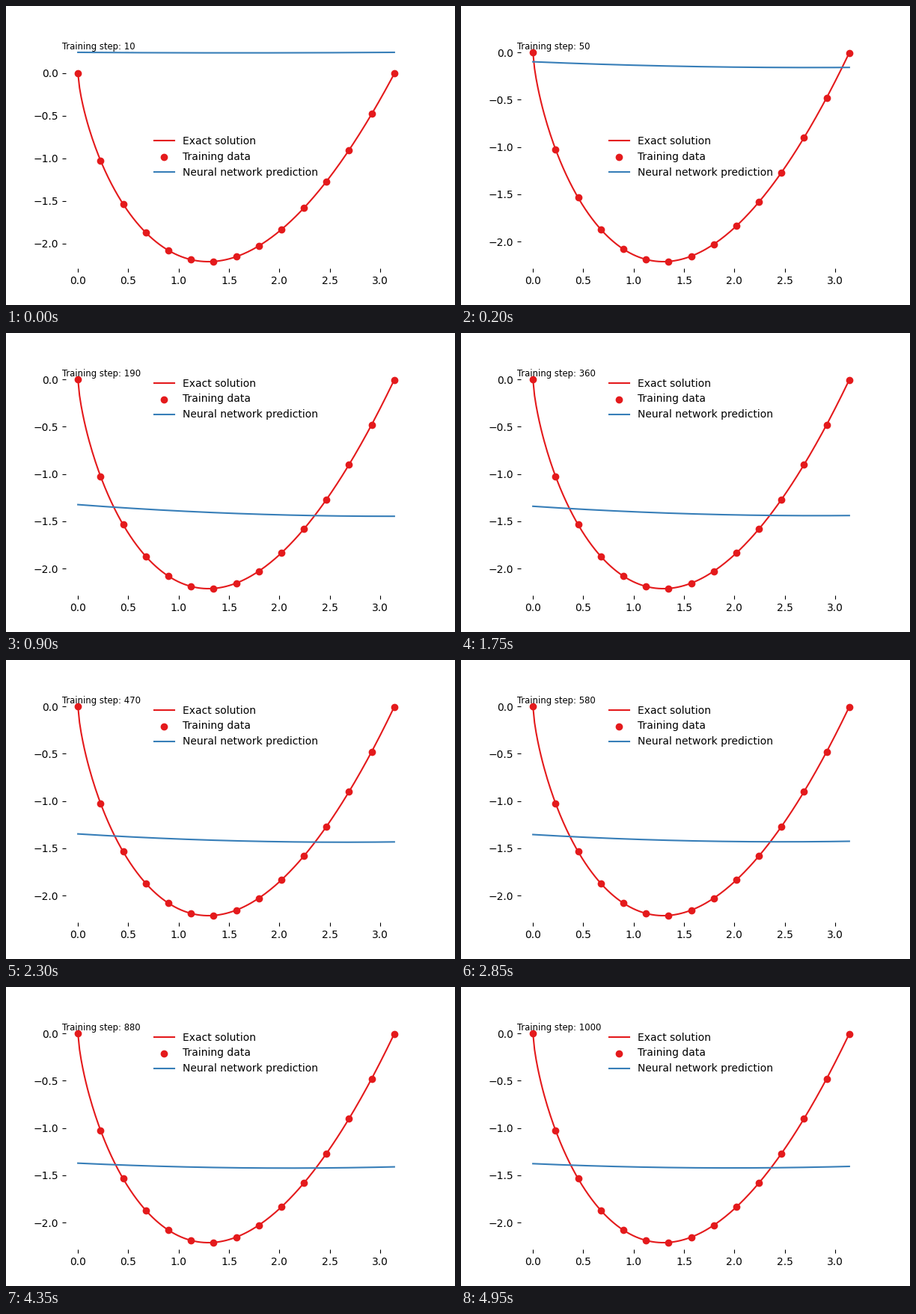
Animation of 600x400 px, one loop 5 s. Source, as a matplotlib script:

```python
import matplotlib.pyplot as plt
import numpy as np
from matplotlib.animation import FuncAnimation

RED, BLUE = "#e41a1c", "#377eb8"
FRAMES, INTERVAL = 100, 50
X_END = 3.14

# Shape of the prediction at a few training steps
STEPS = [10, 50, 190, 360, 580, 760, 1000]
TILT = [0, -0.06, -0.123, -0.098, -0.071, -0.049, -0.029]
BOW = [0.006, 0.02, 0.032, 0.031, 0.031, 0.030, 0.029]


def exact(x):
    return x**0.7 * (x - 3.142)


def predict(x, step):
    """Nearly flat parabola whose level settles at the mean of the data."""
    u = x / X_END
    level = -1.412 + 1.736 / (1 + np.exp((step - 70) / 20))
    tilt = np.interp(step, STEPS, TILT)
    bow = np.interp(step, STEPS, BOW)
    return level + tilt * (u - 0.5) + bow * (2 / 3 - 4 * u * (1 - u))


x = np.linspace(0, X_END, 200)
x_train = np.linspace(0, X_END, 15)

plt.rcParams["font.family"] = "DejaVu Sans"
fig, ax = plt.subplots(figsize=(6, 4), dpi=100)
ax.set_frame_on(False)
ax.tick_params(direction="in")

ax.plot(x, exact(x), color=RED, label="Exact solution")
ax.scatter(x_train, exact(x_train), color=RED, label="Training data")
pred, = ax.plot(x, predict(x, 10), color=BLUE,
                label="Neural network prediction")
ax.legend(loc="best", frameon=False)
caption = ax.text(0, 1, "", transform=ax.transAxes, va="top", fontsize="small")


def update(i):
    step = 10 * (i + 1)
    pred.set_ydata(predict(x, step))
    caption.set_text(f"Training step: {step}")
    ax.relim()
    ax.autoscale_view()
    return pred, caption


anim = FuncAnimation(fig, update, frames=FRAMES, interval=INTERVAL,
                     repeat=True, repeat_delay=0)
plt.show()
```
